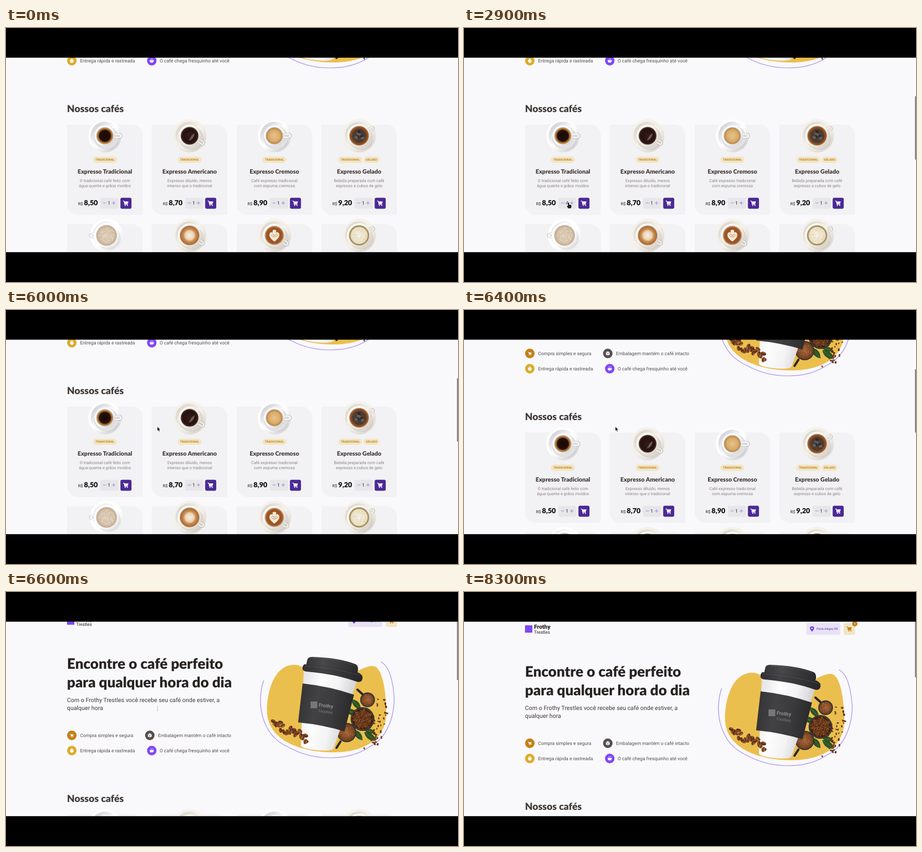
Animation of 800 by 450 pixels, one loop 8.4 s. Source, as an HTML page with a canvas:

```html
<!DOCTYPE html>
<html lang="pt-BR">
<head>
<meta charset="utf-8">
<title>Nossos cafés</title>
<style>
  html, body { margin: 0; width: 100%; height: 100%; overflow: hidden; background: #000; }
  #view { position: absolute; left: 0; top: 52px; width: 800px; height: 346px; overflow: hidden; background: #f9f8fb; }
  #page, #over { position: absolute; left: 0; top: -52px; }
  #page { width: 800px; height: 640px; }
  #art, #copy { position: absolute; left: 0; top: 0; }
  #copy { font-family: Roboto, sans-serif; text-rendering: geometricPrecision; }
  #copy .title { font-family: Lato, sans-serif; font-weight: 900; }
</style>
</head>
<body>
<div id="view">
  <div id="page">
    <canvas id="art" width="800" height="640"></canvas>
    <svg id="copy" width="800" height="640"></svg>
  </div>
  <canvas id="over" width="800" height="450"></canvas>
</div>
<script>
const LOOP = 8400, STEP = 100;
const PURPLE = '#8047f8', DEEP = '#4b2995', OCHRE = '#c47f17', GOLD = '#dbac2c';
const INK = '#272221', BROWN = '#403937', GREY = '#574f4d';
const $ = id => document.getElementById(id);
const g = $('art').getContext('2d'), o = $('over').getContext('2d');

// ---------- drawing helpers ----------
function text(x, y, str, size, fill, extra = {}) {
  const el = document.createElementNS('http://www.w3.org/2000/svg', 'text');
  const attrs = { x, y, 'font-size': size, fill, ...extra };
  for (const k in attrs) el.setAttribute(k, attrs[k]);
  el.textContent = str;
  $('copy').append(el);
  return el;
}
const MID = { 'text-anchor': 'middle' }, TITLE = { class: 'title' };

function box(x, y, w, h, r, fill) {
  g.fillStyle = fill;
  g.beginPath();
  g.roundRect(x, y, w, h, r);
  g.fill();
}
function oval(x, y, rx, ry, fill, turn = 0) {
  g.fillStyle = fill;
  g.beginPath();
  g.ellipse(x, y, rx, ry, turn, 0, 7);
  g.fill();
}
const dot = (x, y, r, fill) => oval(x, y, r, r, fill);
function shape(d, fill) {
  g.fillStyle = fill;
  g.fill(new Path2D(d));
}
function line(d, color, width) {
  g.strokeStyle = color;
  g.lineWidth = width;
  g.lineCap = 'round';
  g.stroke(new Path2D(d));
}
function radial(x, y, r, ...stops) {
  const grad = g.createRadialGradient(x, y, 0, x, y, r);
  stops.forEach(([at, c]) => grad.addColorStop(at, c));
  return grad;
}
function linear(x0, y0, x1, y1, ...colors) {
  const grad = g.createLinearGradient(x0, y0, x1, y1);
  colors.forEach((c, i) => grad.addColorStop(i / (colors.length - 1), c));
  return grad;
}
let seed = 11;
const rnd = () => (seed = seed * 16807 % 2147483647) / 2147483647;

// ---------- icons ----------
function at(x, y, scale, draw) {
  g.save();
  g.translate(x, y);
  g.scale(scale, scale);
  draw();
  g.restore();
}
function cart(x, y, scale, color) {
  at(x, y, scale, () => {
    line('M-5 -4H-3.4L-1.8 2.6H3.6', color, 1.1);
    shape('M-3.2 -3H5L3.6 1.6H-2.2Z', color);
    dot(-1.2, 4.3, 1, color);
    dot(3.1, 4.3, 1, color);
  });
}
function pin(x, y) {
  shape(`M${x} ${y + 5}C${x - 6} ${y - 1} ${x - 4} ${y - 4.5} ${x} ${y - 4.5}S${x + 6} ${y - 1} ${x} ${y + 5}Z`, '#6a3bd8');
  dot(x, y - 1, 1.4, '#ebe5f9');
}
const badges = [
  [116.5, 268, OCHRE, () => cart(0, 0, .62, '#fff')],
  [254.5, 268, GREY, () => {
    shape('M0 -3.8L3.3 -2V2L0 3.8L-3.3 2V-2Z', '#fff');
    line('M-3 -1.8L0 0L3 -1.8M0 0V3.4', GREY, .6);
  }],
  [116.5, 295, GOLD, () => {
    dot(0, .4, 3.1, '#fff');
    line('M0 .4L1.2 -.9', GOLD, .7);
    line('M-1 -3.6H1', '#fff', .8);
  }],
  [258, 295, PURPLE, () => {
    shape('M-3.6 -1H3.2Q3.2 3 1.2 3.2H-1.8Q-3.6 3 -3.6 -1Z', '#fff');
    line('M3.2 -.4Q5 0 3 1.4M-1.6 -3.4V-2.2M.2 -3.4V-2.2M2 -3.4V-2.2', '#fff', .7);
  }]
];

// ---------- hero ----------
function bean(x, y, r, turn, color = '#6d3a1c') {
  g.save();
  g.translate(x, y);
  g.rotate(turn);
  oval(0, 0, r, r * .68, color);
  oval(-r * .1, -r * .25, r * .7, r * .25, 'rgba(190,120,70,.45)');
  line(`M${-r * .8} 0Q0 ${r * .4} ${r * .8} 0`, '#32170b', r * .17);
  g.restore();
}
function bowl(x, y, r, fill) {
  dot(x, y, r, '#25211f');
  dot(x, y, r - 1, '#4a4440');
  dot(x, y, r - 2.5, fill);
}
function leaf(x, y, len, turn) {
  g.save();
  g.translate(x, y);
  g.rotate(turn);
  shape(`M0 0Q${len / 2} ${-len * .42} ${len} 0Q${len / 2} ${len * .42} 0 0Z`, '#2c5223');
  line(`M1 0H${len - 2}`, '#6c9150', .6);
  g.restore();
}
function grounds(x, y, r) {
  bowl(x, y, r, radial(x, y, r, [0, '#a5653a'], [1, '#6b3818']));
  for (let i = 0; i < r * 5; i++) {
    const a = rnd() * 7, d = Math.sqrt(rnd()) * (r - 4);
    dot(x + Math.cos(a) * d, y + Math.sin(a) * d, .6, i % 2 ? '#8a4c26' : '#bd7c4c');
  }
}
function hero() {
  shape('M462 224C462 192 474 143 510 143C534 143 540 172 566 172C606 172 626 145 649 145C666 145 673 190 673 228C673 276 632 298 580 298C520 298 462 276 462 224Z', '#ebbf4e');
  line('M456 171C444 205 448 266 500 289C545 314 605 314 642 289C683 270 690 215 686 190C683 165 676 144 664 138', '#ab92ea', 1.2);

  // scoops, leaves and loose beans
  leaf(628, 222, 24, -2.3);
  leaf(624, 232, 26, -2.75);
  leaf(616, 258, 24, .9);
  leaf(634, 258, 20, .25);
  leaf(634, 262, 26, .65);
  line('M622 187L632 196', '#2d2826', 4);
  for (let i = 0; i < 46; i++) {
    const y = 204 + rnd() * 80;
    bean(644 + rnd() * (36 - Math.abs(y - 218) * .28), y, 1.5 + rnd() * 1.1, rnd() * 6, i % 3 ? '#5d2f17' : '#85502a');
  }
  grounds(640, 205, 13);
  bowl(631, 239, 21, '#3a1c0e');
  for (let i = 0; i < 62; i++) {
    const a = i * 2.4, d = Math.sqrt(i / 62) * 16.5;
    bean(631 + Math.cos(a) * d, 239 + Math.sin(a) * d, 2.7, a * 3, i % 3 ? '#693719' : '#87502a');
  }
  grounds(603, 263, 17);
  line('M592 279L585 290', '#2d2826', 4);
  bean(634, 291, 1.8, 1);

  // paper cup
  shape('M527 150L522 286Q523 291 548 294Q577 297 580 291L622 170Z', linear(518, 200, 612, 222, '#e4e4e6', '#fdfdfd', '#f3f3f4', '#cfcfd2'));
  shape('M525 176Q572 181 616 196L599 261Q560 249 517 245Z', linear(518, 205, 610, 220, '#343335', '#424143', '#3b3a3c', '#2b2a2c'));
  shape('M533 135Q534 129 541 129Q588 130 619 142Q624 145 623 153L620 163L530 149Z', linear(530, 135, 625, 150, '#343436', '#48484b', '#39393c', '#2a2a2c'));
  shape('M528 142Q524 145 525 151Q526 154 532 155Q582 159 621 173Q630 175 631 167Q632 161 624 157Q580 144 528 142Z', linear(525, 150, 631, 160, '#2f2f31', '#434346', '#353538', '#262628'));
  line('M529 145Q582 148 627 162', 'rgba(120,120,126,.4)', .8);
  line('M541 131Q588 132 617 144', 'rgba(120,120,126,.35)', .8);
  box(539, 208, 12, 12, 0, '#77777a');
  text(553, 217, 'Frothy', 9, '#858588', { 'font-weight': 900, transform: 'rotate(7 553 217)' });
  text(552, 227, 'Trestles', 7.3, '#7c7c7f', { transform: 'rotate(7 552 227)' });

  // spilled beans
  for (let i = 0; i < 24; i++) {
    const u = (i + .5) / 24;
    bean(474 + u * 58 + rnd() * 4 - 2, 247 + u * 28 + (rnd() - .5) * 17, 4.1 + rnd(), rnd() * 6, i % 3 ? '#6f3b1c' : '#8d542c');
  }
  bean(473, 243, 4.4, .4);
  bean(530, 279, 4.6, 1.9, '#8d542c');
}

// ---------- coffee cups seen from above ----------
const WHITE = ['#fdfdfd', '#d3d3d8'], CREAM = ['#f4f1eb', '#dcd6cc'];
const cups = [
  { plate: WHITE, turn: 0, r: 14.5, fill: [[0, '#150906'], [.68, '#25110a'], [.8, '#9a6128'], [1, '#c99350']] },
  { plate: CREAM, turn: .5, r: 15.5, fill: [[0, '#351c1a'], [.75, '#241110'], [1, '#4a2a20']], shine: 'M-2 9Q8 6 9 -5L4 -1Z' },
  { plate: WHITE, turn: 0, r: 14.5, fill: [[0, '#e6c38c'], [.7, '#d9ab69'], [1, '#b98343']] },
  { plate: CREAM, turn: -.5, r: 17, fill: [[0, '#4b413c'], [.65, '#4a3b33'], [.8, '#824720'], [1, '#a5652f']], ice: true },
  { plate: ['#ffffff', '#ececee'], turn: Math.PI, r: 18, dx: 3, fill: [[0, '#dccbb6'], [.8, '#d2bea6'], [1, '#bfa588']], foam: '#e9ddcd' },
  { plate: CREAM, turn: .55, r: 17, fill: [[0, '#f8eee0'], [.45, '#ecd4b4'], [.65, '#c88e55'], [1, '#a9662d']] },
  { plate: CREAM, turn: .6, r: 16.5, fill: [[0, '#b26d38'], [.8, '#985022'], [1, '#c08a57']], heart: true },
  { plate: CREAM, turn: -.45, r: 17.5, fill: [[0, '#f6f0e2'], [.8, '#ece1c9'], [.92, '#ab9150'], [1, '#8e7638']], foam: '#d9d3b2' }
];
function cup(x, y, c) {
  const [light, shade] = c.plate;
  at(x + (c.dx || 0), y, 1, () => {
    dot(0, 0, 29.5, linear(-20, -22, 20, 24, light, light, shade));
    dot(0, 0, 25, linear(-18, -18, 18, 18, shade, light, light));
    oval(3, 4, 22, 21, 'rgba(90,85,85,.16)');
    g.save();
    g.rotate(c.turn);
    line('M18 -2.5Q29 -4 29 0T18 2.5', 'rgba(110,105,105,.4)', 3.6);
    line('M18 -2.5Q28.5 -4 28.5 0T18 2.5', light, 2.5);
    g.restore();
    dot(0, 0, c.r + 4, linear(-14, -14, 15, 15, '#ffffff', light, shade));
    dot(0, 0, c.r + 1.2, shade);
    dot(0, 0, c.r, radial(0, 0, c.r, ...c.fill));
    if (c.shine) shape(c.shine, 'rgba(210,190,185,.4)');
    if (c.ice) for (let i = 0; i < 7; i++) {
      const a = i * 2.2, d = 2 + i;
      box(Math.cos(a) * d - 3, Math.sin(a) * d - 3, 5.5, 5, 1.5, i % 2 ? '#2f2926' : '#665d57');
    }
    if (c.foam) for (let i = 0; i < 60; i++) {
      const a = rnd() * 7, d = Math.sqrt(rnd()) * c.r * .8;
      dot(Math.cos(a) * d, Math.sin(a) * d, .5 + rnd() * .5, c.foam);
    }
    if (c.heart) {
      shape('M0 11C-5 7 -11 2 -8 -4Q-5 -8 0 -3Q5 -8 8 -4C11 2 5 7 0 11Z', '#f6e9d8');
      shape('M0 -1Q-4 -5 -3 -9Q0 -11 3 -9Q4 -5 0 -1Z', '#f6e9d8');
      line('M-6 -1Q0 7 6 -1M-4 -3Q0 3 4 -3', '#b97c48', .9);
    }
  });
}

// ---------- page ----------
const menu = [
  ['Expresso Tradicional', 'O tradicional café feito com', 'água quente e grãos moídos', '8,50'],
  ['Expresso Americano', 'Expresso diluído, menos', 'intenso que o tradicional', '8,70'],
  ['Expresso Cremoso', 'Café expresso tradicional', 'com espuma cremosa', '8,90'],
  ['Expresso Gelado', 'Bebida preparada com café', 'expresso e cubos de gelo', '9,20']
];
function tag(x, w, str) {
  box(x - w / 2, 465, w, 11, 5.5, '#f1e6c4');
  text(x, 472.4, str, 5.2, OCHRE, { ...MID, 'font-weight': 700 });
}
function card(x, i) {
  const [name, first, second, price] = menu[i], mid = x + 67;
  box(x, 408, 134, 160, [3, 19, 3, 19], '#f2f1f3');
  cup(mid, 428, cups[i]);
  if (i < 3) tag(mid, 42, 'TRADICIONAL');
  else {
    tag(609.5, 42, 'TRADICIONAL');
    tag(647, 28, 'GELADO');
  }
  text(mid, 494.5, name, 10.5, BROWN, { ...MID, ...TITLE });
  text(mid, 509.6, first, 7.29, '#8d8686', MID);
  text(mid, 519.1, second, 7.29, '#8d8686', MID);
  text(x + 19.5, 551, 'R$', 7.29, INK);
  text(x + 30, 551, price, 12.4, '#0e0c0c', TITLE);
  box(x + 59, 537.7, 32, 19.6, 3, '#e7e6e8');
  line(`M${x + 64} 547H${x + 69}M${x + 80} 547H${x + 85.4}M${x + 82.7} 544.3V549.7`, '#9673e8', .8);
  box(x + 94.5, 537.7, 19.6, 19.6, 3, DEEP);
  cart(x + 104, 547.2, .95, '#fff');
  return text(x + 74.4, 550.4, '1', 8.33, INK, MID);
}
function build() {
  box(108, 59, 13, 13, 0, PURPLE);
  text(124, 64.6, 'Frothy', 10, INK, { 'font-weight': 900 });
  text(124, 74.4, 'Trestles', 7.9, INK);
  box(606, 55, 60, 21, 3, '#e9e2f6');
  pin(616, 65.3);
  text(624, 67.3, 'Porto Alegre, RS', 5.24, DEEP);
  box(672, 55, 20, 21, 3, '#f1e6c4');
  cart(681.8, 65.2, .92, OCHRE);
  dot(691.7, 56.3, 4.6, OCHRE);
  text(691.7, 58.2, '1', 5.2, '#fff', { ...MID, 'font-weight': 700 });

  text(108, 150.2, 'Encontre o café perfeito', 25.5, INK, TITLE);
  text(108, 182.6, 'para qualquer hora do dia', 25.5, INK, TITLE);
  text(108, 209.4, 'Com o Frothy Trestles você recebe seu café onde estiver, a', 10.42, BROWN);
  text(108, 223, 'qualquer hora', 10.42, BROWN);
  for (const [x, y, color, icon] of badges) {
    dot(x, y, 8.4, color);
    at(x, y, 1, icon);
  }
  text(131, 271, 'Compra simples e segura', 8.33, GREY);
  text(269, 271, 'Embalagem mantém o café intacto', 8.33, GREY);
  text(131, 297.8, 'Entrega rápida e rastreada', 8.33, GREY);
  text(272, 297.8, 'O café chega fresquinho até você', 8.33, GREY);
  hero();

  text(108, 386, 'Nossos cafés', 17.25, BROWN, TITLE);
  const counters = menu.map((_, i) => card(108 + 150 * i, i));
  for (let i = 0; i < 4; i++) {
    box(108 + 150 * i, 584.5, 134, 160, [3, 19, 3, 19], '#f2f1f3');
    cup(175 + 150 * i, 604.5, cups[i + 4]);
  }
  return counters[0];
}
const counter = build();

// ---------- motion ----------
// time, x, y of the pointer tip
const path = [
  [400, 796, 300], [1200, 88, 250], [1500, 190, 306], [1800, 191, 307], [2100, 211, 306],
  [2400, 211, 306], [2500, 207, 307], [2900, 185, 309], [3100, 172, 309.5], [3300, 172, 309.5],
  [3600, 173.5, 309.5], [4300, 173.5, 309.5], [4800, 178, 309.5], [5000, 192, 310], [5100, 192, 310],
  [6000, 268, 207], [8400, 268, 207]
];
// time and quantity after each click
const clicks = [[0, 1], [1600, 2], [1700, 3], [1800, 4], [3100, 3], [3800, 2], [4400, 1]];

const ease = u => u * u * (3 - 2 * u);
function along(t) {
  const i = path.findIndex(p => p[0] > t);
  const [t0, x0, y0] = path[i - 1], [t1, x1, y1] = path[i];
  const e = ease((t - t0) / (t1 - t0));
  return [x0 + (x1 - x0) * e, y0 + (y1 - y0) * e];
}
function scrollAt(t) {
  const u = Math.min(1, Math.max(0, (t - 6300) / 353));
  return Math.round(237 * (1 - ease(u)));
}
const arrow = new Path2D('M0 0V7L1.7 5.5L2.9 8.2L4 7.7L2.8 5.1H5Z');
const hand = new Path2D('M-1 1Q0 -1 1 1V4Q4 3.8 5.2 5.2V8L4 10.5H-.5L-3 7Q-3.4 5.4 -1 6.4Z');
const beam = new Path2D('M-1 -4H1M0 -4V3M-1 3H1');

function pointer(t) {
  if (t < 400 || t >= 7100) return;
  const [x, y] = along(t);
  o.save();
  o.translate(x, y);
  if (t >= 6600) {
    o.strokeStyle = 'rgba(90,85,95,.5)';
    o.lineWidth = .6;
    o.stroke(beam);
  } else {
    const onButton = t < 6000 && y > 301 && x > 167 && x < 222;
    const icon = onButton ? hand : arrow;
    o.strokeStyle = '#fff';
    o.lineWidth = 1.2;
    o.stroke(icon);
    o.fillStyle = '#1b1a1c';
    o.fill(icon);
  }
  o.restore();
}
function bar(x, y, w, h, fill) {
  o.fillStyle = fill;
  o.fillRect(x, y, w, h);
}
function render(t) {
  const scroll = scrollAt(t);
  $('page').style.transform = `translateY(${-scroll}px)`;
  counter.textContent = clicks.findLast(c => c[0] <= t)[1];
  o.clearRect(0, 0, 800, 450);
  if (t >= 400) bar(798.3, 39 + scroll * .346, 1.7, 112, '#777579');
  pointer(t);
  // soft edges of the letterbox
  bar(0, 52, 800, 1, 'rgba(0,0,0,.6)');
  bar(0, 397, 800, 1, 'rgba(0,0,0,.85)');
}
const start = performance.now();
function tick() {
  const t = (performance.now() - start) % LOOP;
  render(Math.floor(t / STEP) * STEP);
  requestAnimationFrame(tick);
}
tick();
</script>
</body>
</html>
```
